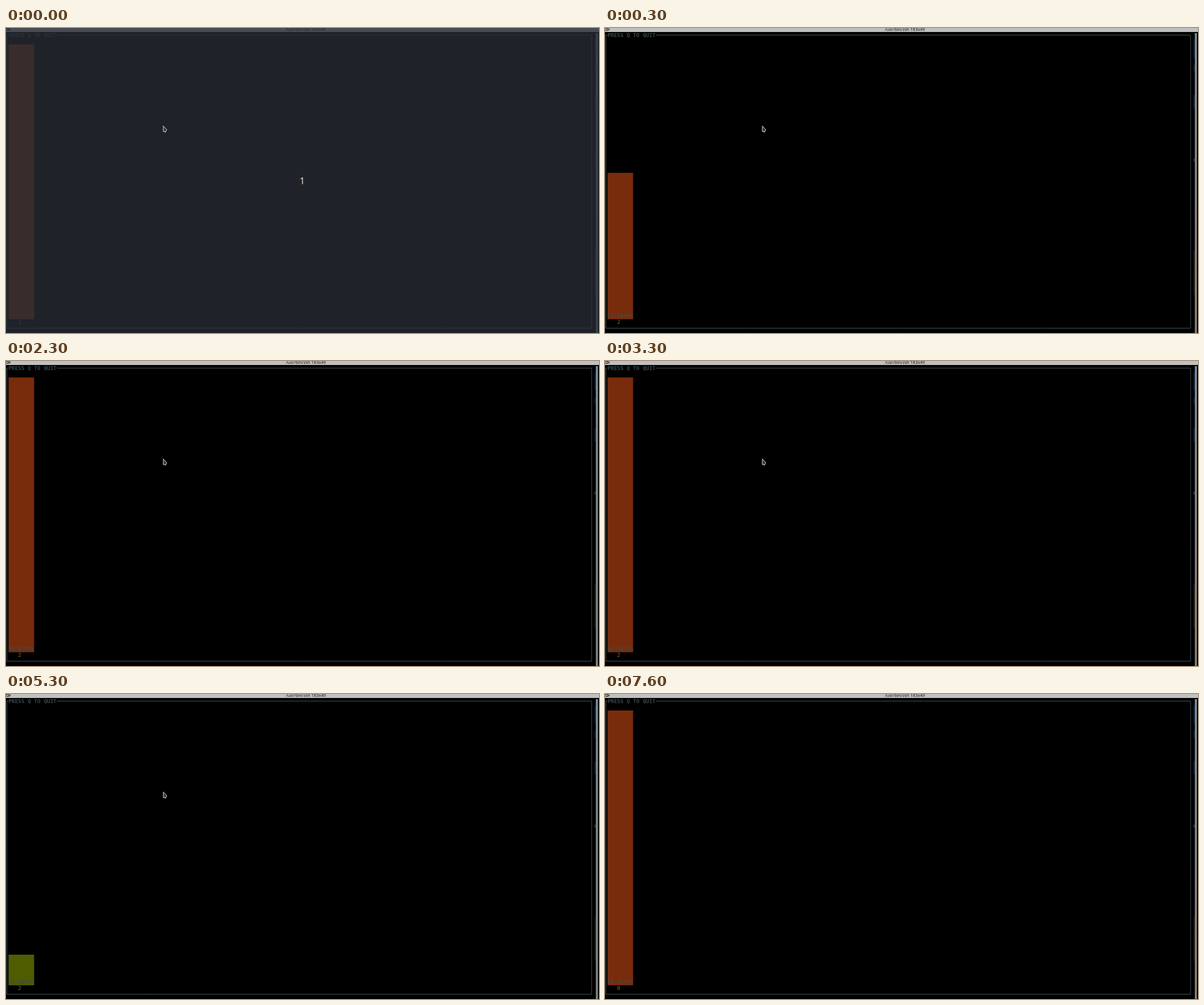
These frames come from a looping animation (1044x537 px, 8.1 s). An HTML page with a canvas:

```html
<!DOCTYPE html>
<html lang="en">
<head>
<meta charset="utf-8">
<title>Terminal bar chart</title>
<style>
  html, body { margin: 0; width: 100%; height: 100%; overflow: hidden; background: #000; }
  canvas { display: block; }
</style>
</head>
<body>
<canvas id="stage" width="1044" height="537"></canvas>
<script>
const ctx = document.getElementById('stage').getContext('2d');
const LOOP = 8100;
const CELL = 5.64, ROW = 10.75;
const LEFT = 4.4, FLOOR = 512.8, STEP = 9 * CELL;
const MONO = '9.37px "DejaVu Sans Mono", monospace';
const SANS = '"Noto Sans", sans-serif';
const RED = '#782c0c', GREEN = '#4f5c00';

// Each state: start time, then bars as [label, rows, value]
const states = [
  [0, [['2', 45, '']]],
  [100, [['2', 45, '99.9992%']]],
  [300, [['2', 24, '53.1846%']]],
  [1300, [['2', 27, '59.7716%'], ['3', 1, '1.76745%']]],
  [2300, [['2', 45, '99.9795%']]],
  [3300, [['2', 45, '99.8641%']]],
  [4300, [['2', 45, '98.2799%']]],
  [5300, [['2', 5, '11.8007%']]],
  [6400, [['0', 43, '95.5217%'], ['1', 1, '1.53182%'], ['2', 1, '1.40627%'],
          ['3', 1, '1.27041%'], ['4', 0, '0.27%']]],
  [7400, [['0', 45, '98.9175%']]]
];

function rect(x, y, w, h, color) {
  ctx.fillStyle = color;
  ctx.fillRect(x, y, w, h);
}

function text(str, x, y, font, color, align = 'left') {
  ctx.font = font;
  ctx.fillStyle = color;
  ctx.textAlign = align;
  ctx.fillText(str, x, y);
}

function drawWindow() {
  rect(0, 0, 1044, 537, '#000');
  rect(0, 0, 1044, 7, '#c0c0c0');
  ctx.lineWidth = 1;
  ctx.strokeStyle = '#333';
  ctx.strokeRect(1.5, 0.5, 3, 4);
  ctx.strokeRect(4.5, 1.5, 3, 2);
  text('/usr/bin/zsh 183x49', 528, 4.8, '7.5px ' + SANS, '#111', 'center');

  ctx.strokeStyle = '#435258';
  ctx.beginPath();
  ctx.moveTo(4, 12.5);
  ctx.lineTo(1.5, 12.5);
  ctx.lineTo(1.5, 528.5);
  ctx.lineTo(1031, 528.5);
  ctx.lineTo(1031, 12.5);
  ctx.lineTo(89.5, 12.5);
  ctx.stroke();
  text('PRESS Q TO QUIT', LEFT, 16, 'bold ' + MONO, '#37474c');
}

function drawEdge() {
  const strip = ctx.createLinearGradient(0, 9, 0, 537);
  strip.addColorStop(0, '#7c92a5');
  strip.addColorStop(0.3, '#858b8f');
  strip.addColorStop(1, '#85857c');
  rect(1038.5, 9, 3.5, 528, strip);
  rect(1036, 20, 2, 32, '#0d1a30');
  rect(1036, 65, 2, 12, '#0d1a30');
  rect(1036, 118, 2, 24, '#101e38');
  rect(1036, 230, 2, 5, '#333');
  rect(1036, 392, 2, 78, '#17180c');
}

function drawBar([label, rows, value], i) {
  const x = LEFT + i * STEP;
  const color = rows > 22 ? RED : GREEN;
  const top = Math.round(FLOOR - rows * ROW);
  if (rows) rect(x, top, 8 * CELL, FLOOR - top, color);
  const vx = x + Math.floor((8 - value.length) / 2) * CELL;
  if (!rows) rect(vx, FLOOR - ROW, value.length * CELL, ROW, color);
  text(value, vx, 510.4, 'bold ' + MONO, '#3d4c4c');
  text(label, x + 3 * CELL, 521, MONO, '#72780a');
}

function drawCursor(x, y) {
  ctx.beginPath();
  ctx.moveTo(x, y);
  ctx.lineTo(x + 6, y + 6.5);
  ctx.lineTo(x + 3.5, y + 11.5);
  ctx.lineTo(x + 2.5, y + 9.3);
  ctx.lineTo(x, y + 10);
  ctx.closePath();
  ctx.fillStyle = '#333';
  ctx.fill();
  ctx.lineWidth = 1;
  ctx.strokeStyle = '#e0e0e0';
  ctx.stroke();
}

function draw(t) {
  drawWindow();
  drawEdge();
  const state = states.filter(s => s[0] <= t).pop();
  state[1].forEach(drawBar);

  if (t < 100) {
    rect(0, 0, 1044, 537, 'rgba(40,44,53,0.78)');
    text('1', 521.5, 274.5, '16px ' + SANS, '#e4dfc8', 'center');
  }

  // The pointer leaves through the top edge in 100 ms steps
  const k = t < 7200 ? 0 : Math.floor((t - 7200) / 100) + 1;
  if (k < 5) drawCursor(277 - 10 * k, 172.5 - 42 * k);
}

function tick() {
  draw(performance.now() % LOOP);
  requestAnimationFrame(tick);
}
tick();
</script>
</body>
</html>
```
